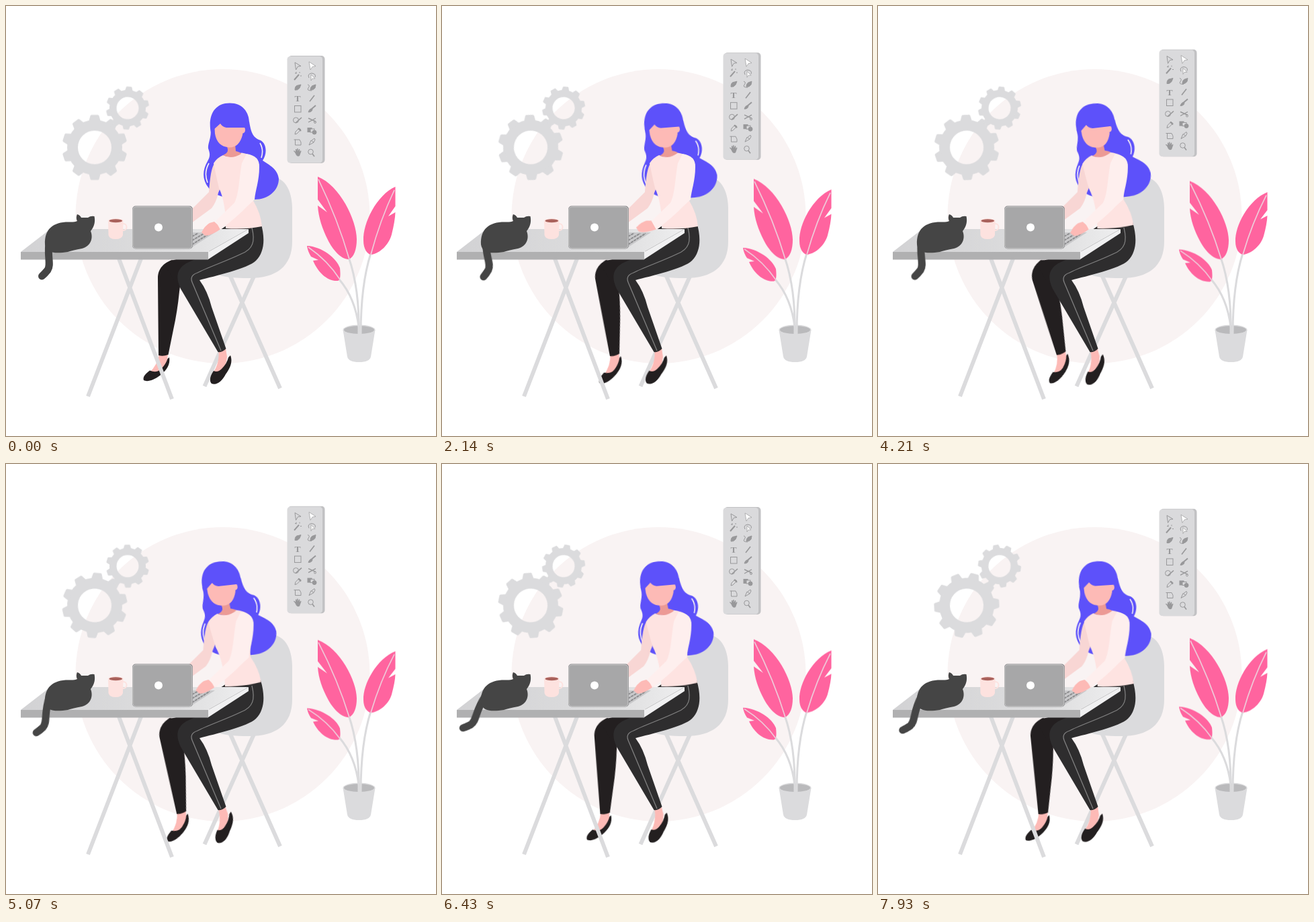
Animation, 640 px wide and 640 px high, one loop 8000 ms. Source, as an HTML page without scripts:

```html
<!DOCTYPE html>
<html lang="en">
<head>
<meta charset="utf-8">
<title>Designer at work</title>
<style>
html, body { margin: 0; width: 100%; height: 100%; overflow: hidden; background: #fff; }
svg { display: block; width: 100vw; height: 100vh; }
.gray { fill: #dbdbdd; }
.bar { stroke: #dbdbdd; stroke-width: 6; fill: none; }
.skin { fill: #fdbab6; }
.ink { fill: #231f20; }
.hair { fill: #5d51fa; }
.leaf { fill: #ff649f; }
.vein { stroke: #efcdda; stroke-width: 1.7; fill: none; }
.stem { stroke: #dbdbdd; stroke-width: 3; fill: none; }
.icon { fill: none; stroke: #98989a; stroke-width: 1; }
.icon .f { fill: #98989a; }
.icon .w { fill: #fff; stroke-width: .7; }

/* every part shares one 8 s linear clock */
.move { animation: 8s linear infinite; }
.spin { animation-name: spin; }
.float { animation-name: float; }
.droop { animation-name: droop; }
.tail { animation-name: tail; transform-origin: 64.5px 344px; }
.shin { animation-name: shin; transform-origin: 245px 393px; }
.foot { animation-name: foot; transform-origin: 321px 515px; }
.torso { animation-name: torso; transform-origin: 330px 345px; }
.head { animation-name: head; transform-origin: 335px 210px; }
.arm { animation-name: arm; }
.hand { animation-name: hand; transform-origin: 316px 326px; }

@keyframes spin { to { transform: rotate(var(--turn)); } }
@keyframes float {
  66% { transform: translateY(-11.9px); }
  100% { transform: translateY(-7.4px); }
}
@keyframes droop {
  0% { transform: scaleY(1); }
  66% { transform: scaleY(calc(1 - var(--d))); }
  100% { transform: scaleY(calc(1 - .63 * var(--d))); }
}
@keyframes tail {
  0% { transform: rotate(0deg); }
  40.6% { transform: rotate(-12.5deg); }
  80% { transform: rotate(23.5deg); }
  100% { transform: rotate(17deg); }
}
@keyframes shin {
  0% { transform: rotate(0deg); }
  49.5% { transform: rotate(-19deg); }
  87.5% { transform: rotate(-.3deg); }
  100% { transform: rotate(-5.6deg); }
}
@keyframes foot {
  0% { transform: rotate(0deg); }
  15%, 31% { transform: rotate(1.2deg); }
  64% { transform: rotate(-11deg); }
  80% { transform: rotate(-5deg); }
  100% { transform: rotate(2deg); }
}
@keyframes torso {
  0%, 36% { transform: rotate(0deg); }
  64% { transform: rotate(-4.1deg); }
  100% { transform: rotate(-1.1deg); }
}
@keyframes head {
  0% { transform: translateX(0) rotate(0deg); }
  36% { transform: translateX(0) rotate(-6deg); }
  49% { transform: translateX(-4px) rotate(-6.8deg); }
  64% { transform: translateX(-8.7px) rotate(-6.3deg); }
  100% { transform: translateX(-2.3px) rotate(-3.8deg); }
}
@keyframes arm {
  0%, 36% { transform: translateX(0); }
  64% { transform: translateX(-8.7px); }
  100% { transform: translateX(-2.3px); }
}
@keyframes hand {
  0% { transform: rotate(0deg); }
  27% { transform: rotate(16deg); }
  41% { transform: rotate(-3deg); }
  64%, 100% { transform: rotate(0deg); }
}
</style>
</head>
<body>
<svg viewBox="0 0 640 640" xmlns="http://www.w3.org/2000/svg">
<defs>
  <linearGradient id="top" gradientUnits="userSpaceOnUse" x1="22" y1="0" x2="361" y2="0">
    <stop offset="0" stop-color="#d2d2d4"/><stop offset=".7" stop-color="#dededf"/><stop offset="1" stop-color="#eeeeef"/>
  </linearGradient>
  <path id="teeth" d="M-9-38L-6.5-47Q-6-48.5-4.5-48.5H4.5Q6-48.5 6.5-47L9-38ZM-9 38L-6.5 47Q-6 48.5-4.5 48.5H4.5Q6 48.5 6.5 47L9 38Z"/>
  <g id="gear" class="gray">
    <circle r="33" fill="none" stroke="#dbdbdd" stroke-width="16"/>
    <use href="#teeth"/>
    <use href="#teeth" transform="rotate(36)"/>
    <use href="#teeth" transform="rotate(72)"/>
    <use href="#teeth" transform="rotate(108)"/>
    <use href="#teeth" transform="rotate(144)"/>
  </g>
</defs>

<circle cx="322.5" cy="313" r="219" fill="#f9f3f3"/>

<!-- gears -->
<g transform="translate(132 210.5)"><g class="move spin" style="--turn:-276deg"><use href="#gear"/></g></g>
<g transform="translate(181 152) scale(.66)"><g class="move spin" style="--turn:276deg"><use href="#gear" transform="rotate(4)"/></g></g>

<!-- tool panel -->
<g class="move float">
  <rect x="420" y="74" width="54.5" height="160" rx="5" fill="#c2c2c4"/>
  <rect x="418.5" y="75" width="52.5" height="158.5" rx="4.5" fill="#dadadc"/>
  <g class="icon">
    <path d="M430 84L439 89.5L434.5 90L431.5 95Z"/>
    <path class="w" d="M451 83L461 89.5L456 90.5L453 95Z"/>
    <path d="M429 110L436 102" stroke-width="2"/><path d="M432 98V101M437 98V100M438 104H440M430 100H432"/>
    <path d="M451 107Q448 101 455 100Q462 101 460 106"/><path class="w" d="M454 102L460 108L456 108L454 111Z"/>
    <path class="f" d="M430 125Q430 118 435 118L439 117L437 122Q434 126 430 125Z"/>
    <path class="f" d="M453 125Q453 119 458 118L461 117L460 122Q457 126 453 125Z"/><path d="M449 117Q453 118 450 122T455 126"/>
    <path d="M452 142L459 133" stroke-width="1.6"/>
    <rect x="429.5" y="148.5" width="9.5" height="9.5"/>
    <path d="M455 153L461 148" stroke-width="2"/><path class="f" d="M450 158Q452 152 456 153Q456 158 450 158Z"/>
    <circle cx="431.5" cy="170" r="4"/><path d="M431 174L440 166" stroke-width="1.6"/>
    <path d="M450 167L461 172M450 173L461 167" stroke-width="1.4"/><circle cx="460" cy="173" r="1.5"/>
    <path d="M430 191L431 187L436 182L439 184L433 190Z"/><path d="M435 182L439 186" stroke-width="2.2"/>
    <rect class="f" x="449" y="181.5" width="6" height="6"/><rect x="453" y="183" width="6" height="5" fill="#dadadc"/><circle class="f" cx="459" cy="188" r="3"/>
    <path d="M430.5 199H437L439 203V207H430.5ZM428.5 199H431"/>
    <path d="M451 207L454 200L458 203Z"/><path d="M455 200L459 197L460 199L458 203"/>
    <path class="f" stroke="none" d="M430 218L428 216L429 215L431 217V213H432.5V216L433.2 212H434.6V216L436 213H437.2V217L438.5 215L439.5 216L437 223Q434 225 432 222Z"/>
    <circle cx="453.5" cy="217" r="3.8"/><path d="M456 220L459 224" stroke-width="1.6"/>
  </g>
  <text x="434" y="142" text-anchor="middle" font-family="'Liberation Serif', serif" font-size="13.5" font-weight="700" fill="#98989a">T</text>
</g>

<!-- plant -->
<path class="gray" d="M501.5 482L508 522Q510 530 525.5 530T543 522L549.5 482Z"/>
<ellipse class="gray" cx="525.5" cy="482" rx="24" ry="7.5"/>
<ellipse cx="525.5" cy="482" rx="22.5" ry="6" fill="#bababc"/>
<path class="stem" d="M525 488C526 440 519 400 510 374M528 488Q528 415 543 368M525 478Q520 435 496 407"/>
<g class="move droop" style="--d:.066;transform-origin:0 377px">
  <path class="leaf" d="M464 254C497 267 522 319 522 347C522 362 518 374 510 377C498 377 486 362 479 348C471 332 465 315 464 297L478 307L464 288Z"/>
  <path class="vein" d="M465 258Q494 318 511 377"/>
</g>
<g class="move droop" style="--d:.1;transform-origin:0 370px">
  <path class="leaf" d="M579.5 269C552 281 531 323 532 349C532 362 538 370 544 370C557 368 570 355 574 340Q579 320 579.5 307L569 313L579.5 298Z"/>
  <path class="vein" d="M578 274Q557 318 543 370"/>
</g>
<g class="move droop" style="--d:.1;transform-origin:0 425px">
  <path class="leaf" d="M448 357C470 358 492 375 497 390C498 400 498 408 494 409C478 410 464 396 457 379L465 378L454 373Q449 365 448 357Z"/>
  <path class="vein" d="M450 359Q479 379 497 407"/>
</g>

<!-- chair -->
<path class="bar" d="M333 400L408 569M370 400L295.5 566"/>
<path class="gray" d="M360 262C385 248 424 245 426 300V350C426 388 402 405 362 405C340 405 322 404 312 398L330 330Z"/>

<!-- far leg -->
<g class="move shin">
  <path class="skin" d="M228 517H241L240 528Q238 540 230 546H213Q226 534 228 517Z"/>
  <path class="ink" d="M243 523C245 535 237 544 229 550C220 557 210 560 205 557C203 552 208 547 214 542.5Q224 547 231 540Q238 533 240.500 525Z"/>
  <path class="ink" d="M226 405C226 390 236 382 247 378L268 385Q260 405 258 425Q255 455 249 482L241.500 519Q234 522 227 520Z"/>
</g>
<path class="ink" d="M236 385Q248 376 262 376L301 368L268 408H250Z"/>
<path class="bar" d="M168 376L247 585M201 376L122 581"/>

<!-- near leg -->
<g class="move foot">
  <path class="skin" d="M316 510H327L329 522Q328 537 319 546H308Q319 530 316 510Z"/>
  <path class="ink" d="M334 520C338 530 333 540 327 548C322 558 314 565 306 562C302 558 304 550 309 543Q315 546 321 540Q329 532 331 523Z"/>
</g>
<path fill="#2e2d2e" d="M319 333L328 327L379 322C386 345 385 366 372 379C360 391 310 402 288 408Q300 424 306 448L327.5 510Q322 516 315.5 515L260 421C252 404 254 392 268 383L301 368Z"/>
<path d="M366 330C371 350 368 362 350 369C325 381 300 389 285 397Q273 401 277 411L320 513" fill="none" stroke="#808080" stroke-width="1.3"/>

<!-- hair behind the body -->
<g class="move head">
  <path class="hair" d="M304 180C307 195 300 204 301 212C304 220 304 224 300 231C292 245 292 258 301 270C310 284 335 289 370 288C390 288 406 275 406 257C404 242 392 237 382 230C389 220 388 205 379 200C368 196 365 190 362 172Z"/>
  <path d="M302 234Q294 248 300 263M378 204Q384 214 380 226" fill="none" stroke="#f9f3f3" stroke-width="1.6"/>
</g>

<!-- body -->
<path class="move arm" fill="#f8d6d4" d="M316 229C305 234 304 256 302 277L276 303V323L306 301Q313 292 316 278L328 248Z"/>
<g class="move torso">
  <path fill="#fee3e1" d="M323 222Q336 228 350 218.5C362 220 374 226 374 236C374 256 367 275 368 290Q379 308 381 328Q356 333 327 331C328 310 324 285 317 271Q312 250 309 234Q314 226 323 222Z"/>
</g>

<!-- desk -->
<path fill="url(#top)" d="M22 366L66 332H361L301 366Z"/>
<path fill="#f0f0f1" d="M301 366L361 332V338L301 377Z"/>
<rect x="22" y="366" width="279" height="11.5" fill="#b0b0b1"/>
<path fill="#c9c9cb" d="M270 337H311L277 359H270Z"/>
<path d="M277 343L286 338M277 349L295 338.5M277 355L303 338.500" stroke="#8d8d8f" stroke-width="2" stroke-dasharray="4 1"/>

<!-- near arm -->
<g class="move arm">
  <path class="skin move hand" d="M310 321L321 331Q304 343 296 341.5L291 337Q296 327 303 323Z"/>
  <path fill="#feefee" d="M358 220Q378 223 377 240C377 260 371 275 370 288L358 299Q345 313 319 333L312 320L340 293C347 280 347 255 351 234Z"/>
</g>

<!-- laptop -->
<rect x="188" y="297.5" width="90" height="64" rx="5" fill="#8d8d8f"/>
<rect x="188.8" y="298.8" width="88" height="62" rx="4.5" fill="#a7a7a8" stroke="#cfcfd0" stroke-width=".9"/>
<circle cx="227" cy="329.5" r="6" fill="#fff"/>

<!-- head -->
<g class="move head">
  <path fill="#ec9a95" d="M328 206H341L342 216Q350 218 350 220Q336 229 323 222Q331 219 330 213Z"/>
  <ellipse class="skin" cx="352.5" cy="184.5" rx="3.5" ry="5"/>
  <path class="skin" d="M310 174H354L352 192Q347 211 332 210.5Q314 209 311 190Z"/>
  <path class="hair" d="M304 182C302 160 312 144.5 333 144.5C352 144.5 362 158 362 174V181H328Q322 180 319 175L309 184L306 194Z"/>
</g>

<!-- cat -->
<path class="move tail" d="M65 346C60 372 68 384 62 393Q58 398 53.5 402" fill="none" stroke="#454545" stroke-width="11" stroke-linecap="round"/>
<path fill="#454545" d="M58 355C57 332 70 321.5 93 321.5Q102 322 106 320C104 316 105 312 106 310Q110 311 112 315H122Q126 312 131.5 313C133 320 132 328 126 335C130 345 127 357 113 361C104 363 97 364 92 366C78 368 60 370 58 355Z"/>

<!-- mug -->
<circle cx="174.5" cy="329" r="5" fill="none" stroke="#fde2df" stroke-width="2"/>
<path fill="#fde2df" d="M152 319.5L152.5 341Q154 347 163 347T174 341L174.5 319.5Z"/>
<ellipse cx="163.3" cy="319.5" rx="11.3" ry="3.3" fill="#fde2df"/>
<ellipse cx="163.3" cy="319.7" rx="9.8" ry="2.5" fill="#a9615b"/>
</svg>
</body>
</html>
```
